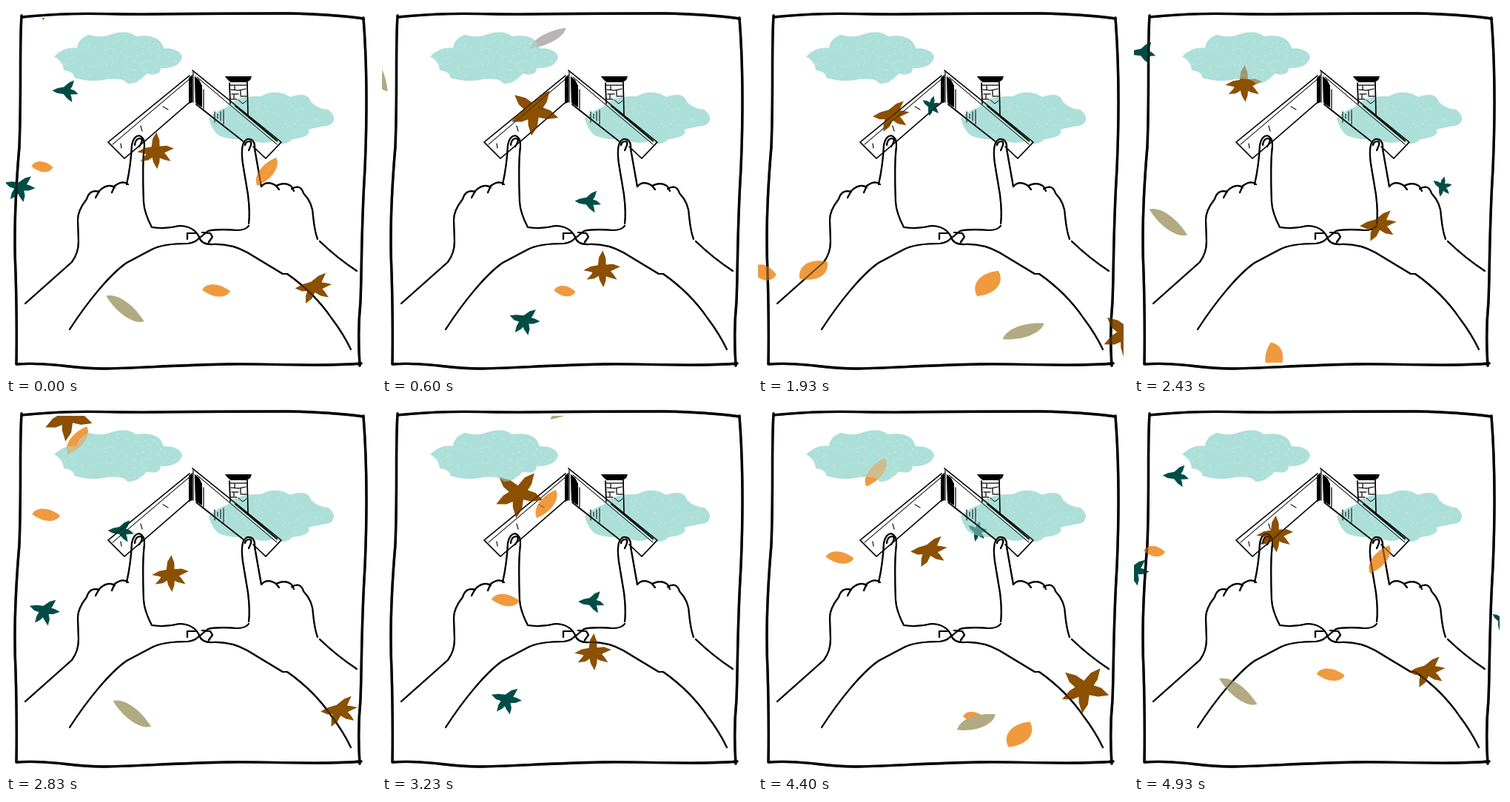
Animation of 500 by 500 pixels, one loop 5010 ms. Source, as an HTML page:

```html
<!DOCTYPE html>
<html lang="en">
<head>
<meta charset="utf-8">
<title>Home in autumn</title>
<style>
  html, body { margin: 0; width: 100%; height: 100%; overflow: hidden; background: #fff; }
  svg { display: block; width: 500px; height: 500px; }
  .ink { fill: none; stroke: #000; stroke-width: 2.2; stroke-linecap: round; stroke-linejoin: round; }
  .border { stroke-width: 3.4; }
  .beam { stroke-width: 1.6; }
  .thin { stroke-width: 1; }
  .cloud { fill: #addfd9; stroke: #addfd9; stroke-width: 2; }
</style>
</head>
<body>
<svg viewBox="0 0 500 500">
  <defs>
    <clipPath id="stage"><rect y="16" width="494" height="466"/></clipPath>
    <path id="cloudA" d="M67 68Q80 55 97 58Q98 45 112 40Q130 45 143 39Q165 33 175 42Q208 38 212 58Q235 58 237 70Q232 84 208 83Q208 95 190 90Q178 104 165 104Q158 95 136 98Q115 103 93 96Q93 88 79 86Q78 74 67 68Z"/>
    <path id="cloudB" d="M275 152Q285 142 300 137Q312 122 345 123Q365 112 384 124Q408 116 411 130Q420 140 435 141Q448 152 437 160Q420 163 407 166Q414 176 386 179Q378 190 361 181Q345 188 330 178Q305 181 288 174Q280 168 275 152Z"/>
    <clipPath id="inClouds"><use href="#cloudA"/><use href="#cloudB"/></clipPath>
    <g id="art">
      <use href="#cloudA" class="cloud"/>
      <use href="#cloudB" class="cloud"/>
      <path id="scratches" clip-path="url(#inClouds)" stroke="#fff" stroke-opacity=".42" stroke-width=".8"/>
      <!-- border -->
      <path class="ink border" d="M21 15C100 7 140 12 200 11S340 10 380 10Q440 11 483 17M21 13C18 60 21 110 18 190C12 260 11 320 13 360Q15 430 14 484M14 484C60 481 90 490 130 490S230 485 300 484S420 488 480 483M483 16C488 80 488 150 485 220C480 300 481 350 479 400Q475 440 478 486"/>
      <!-- roof -->
      <path class="ink beam" d="M248 94 138 184 160 206 186 184 247 131M252 87 372 184 351 206 334 190M257 133 322 184"/>
      <path class="ink thin" d="M144 187 250 97M253 88V130M258 96 366 187M155 186 156 192M182 162 184 169M212 136 219 140"/>
      <path class="ink" d="M310 135 366 182"/>
      <path d="M247 97 252 93V130L247 132ZM255 95 261 100 265 108V137L256 131Z"/>
      <path class="ink thin" d="M267 113V139M282 143V157M286 146V152M290 143V155M294 141V160"/>
      <!-- chimney -->
      <path d="M296 95H332L330 100 325 103H304L300 100Z"/>
      <path class="ink beam" d="M302 104 303 132M326 103 327 147"/>
      <path class="ink thin" d="M303 107H325M304 113 314 114 324 112M305 119H314M317 122H325M304 126H312M309 108V113M317 114V121M308 120V125M314 127 320 132 325 128"/>
      <!-- left hand -->
      <path class="ink" d="M163 241Q169 214 170 188Q172 176 180 175Q188 178 187 190Q184 212 186 265Q187 280 197 299Q216 302 234 297Q253 297 261 312M174 188Q175 179 181 179T180 190M261 313Q258 319 246 321Q212 321 197 329L163 347M256 307H245V315M163 347C140 363 110 400 86 437M165 241Q158 235 147 243L143 252M147 245Q137 239 126 250L121 259M126 251Q113 247 109 261Q97 276 97 289L98 318Q98 334 89 346L26 402"/>
      <!-- right hand -->
      <path class="ink" d="M328 294Q330 280 327 255L320 213Q316 184 326 180Q337 179 336 193L345 244M323 188Q324 183 329 183T328 195M328 297Q324 303 312 303Q285 301 273 304L261 314M265 306 276 307 279 312 274 319M261 313Q265 323 280 322Q304 321 326 333L374 362H380Q417 388 440 422Q456 443 466 464M345 244Q353 235 365 243L369 248M365 243Q377 237 386 244L389 250M386 247Q398 240 402 253Q415 267 415 284Q417 304 421 315M424 318Q448 341 474 358"/>
    </g>
  </defs>
  <use href="#art"/>
  <g id="leaves" clip-path="url(#stage)"></g>
  <use href="#art" opacity=".5"/>
</svg>
<script>
const LOOP_MS = 5010;
const LOOP = 100.3; // steps per loop, with a slightly longer seam
const BROWN = "#8b5000", TEAL = "#004d47", ORANGE = "#f09a3e", SAND = "#b2aa82", GREY = "#b9b4b5";

// Pointed lobes at the given angles, with a barb on each side and notches between.
function maple(size, ...tips) {
  const points = [];
  const add = (deg, r) => {
    const a = deg * Math.PI / 180;
    points.push(`${size * r * Math.cos(a)} ${size * r * Math.sin(a)}`);
  };
  tips.forEach((tip, i) => {
    const next = tips[i + 1] ?? tips[0] + 360;
    const gap = next - tip;
    const barb = Math.min(gap * .28, 17);
    add(tip, 1);
    add(tip + barb, .62);
    add(tip + gap / 2, Math.max(.3, .68 - gap * .0045));
    add(next - barb, .66);
  });
  return `M${points.join("L")}Z`;
}

// A slim leaf lying along the x axis, slightly skewed.
function blade(length, width) {
  const l = length / 2, w = width * .67;
  return `M${-l} 0C${-l * .7} ${-w} ${l * .2} ${-w} ${l} 0C${l * .7} ${w} ${-l * .2} ${w} ${-l} 0Z`;
}

const layer = document.getElementById("leaves");
const leaves = [];

// The leaf passes (x, y) at the given step, and once more after `again` steps.
function fall(d, color, step, x, y, vx, vy, { again = 0, drag = 0, turn = 0, spin = 0 } = {}) {
  for (const at of again ? [step, step + again] : [step]) {
    const el = document.createElementNS("http://www.w3.org/2000/svg", "path");
    el.setAttribute("d", d);
    el.setAttribute("fill", color);
    layer.append(el);
    leaves.push({ el, at, x, y, vx, vy, drag, turn, spin });
  }
}

const SLOW = 45.6, QUICK = 27;

fall(maple(25, -48, -8, 35, 115, 175), BROWN, 39, 180, 147, 15, 14.8, { again: SLOW });
fall(maple(34, -52, 16, 96, 154, 219), BROWN, 79.3, 350, 290, 10.9, 11.2, { again: SLOW, drag: .008 });
fall(maple(25, -87, -7, 35, 85, 145, 176), BROWN, 65, 285, 335, 7.25, 12.2, { again: SLOW, drag: .02 });
fall(maple(18, -50, 15, 60, 180), TEAL, 65, 283, 267, 15, 11.3, { again: SLOW + 2, drag: .015 });
fall(maple(21, -43, 5, 77, 128, 197), TEAL, 65, 168, 399, 14.5, 15, { again: SLOW });
fall(maple(14, -75, -10, 45, 100, 215), TEAL, 39, 234, 135, 18.2, 10.9, { again: SLOW });

fall(blade(46, 18), ORANGE, 65, 222, 135, 15.7, 10.7, { again: QUICK, turn: -56 });
fall(blade(38, 16), ORANGE, 65, 167, 265, 14.1, 14.4, { again: QUICK, turn: 3 });
fall(blade(29, 14), ORANGE, 77, 110, 269, 16.5, 14, { again: QUICK, turn: 3 });
fall(blade(34, 20), ORANGE, 39, 8, 360, 15, 15, { turn: 10 });
fall(blade(45, 26), ORANGE, 24, 123, 60, 12.5, 21, { again: SLOW, turn: -50 });
fall(blade(44, 25), ORANGE, 39, 75, 357, 9.8, 10.2, { turn: -32, spin: -7, drag: -.03 });

fall(blade(56, 14), GREY, 24, 426, 161, 16.8, 9.8, { turn: -30 });
fall(blade(56, 14), SAND, 77, 440, 136, 15.7, 10.8, { turn: -31 });
fall(blade(56, 18), SAND, 77, 130, 276, 15, 14, { turn: -22 });
fall(blade(62, 17), SAND, 56.4, 161, 409, 15.5, 15.8, { again: SLOW - 1.7, turn: 34 });
fall(blade(60, 17), SAND, 24, 192, 280, 13.8, 13.2, { turn: 24, spin: -3, drag: .03 });

// Steps come in pairs, held for 30 ms and 70 ms.
function stepAt(ms) {
  return Math.min(99, 2 * Math.floor(ms / 100) + (ms % 100 >= 30 ? 1 : 0));
}

function draw(step) {
  for (const { el, at, x, y, vx, vy, drag, turn, spin } of leaves) {
    const t = (step - at + LOOP * 1.5) % LOOP - LOOP / 2;
    const way = drag ? (1 - Math.exp(-drag * t)) / drag : t;
    el.setAttribute("transform",
      `translate(${x + vx * way} ${y + vy * way}) rotate(${turn + spin * t})`);
  }
}

function scratchClouds() {
  let seed = 7;
  const rnd = () => (seed = seed * 16807 % 2147483647) / 2147483647;
  let d = "";
  for (let i = 0; i < 300; i++) {
    const left = i < 190;
    const x = (left ? 70 : 280) + rnd() * 165;
    const y = (left ? 38 : 118) + rnd() * 66;
    d += `M${x} ${y}l${rnd() * 5 - 2.5} ${rnd() * 5 - 2.5}`;
  }
  document.getElementById("scratches").setAttribute("d", d);
}

scratchClouds();
draw(0);
const begin = performance.now();
function tick() {
  draw(stepAt((performance.now() - begin) % LOOP_MS));
  requestAnimationFrame(tick);
}
requestAnimationFrame(tick);
</script>
</body>
</html>
```
